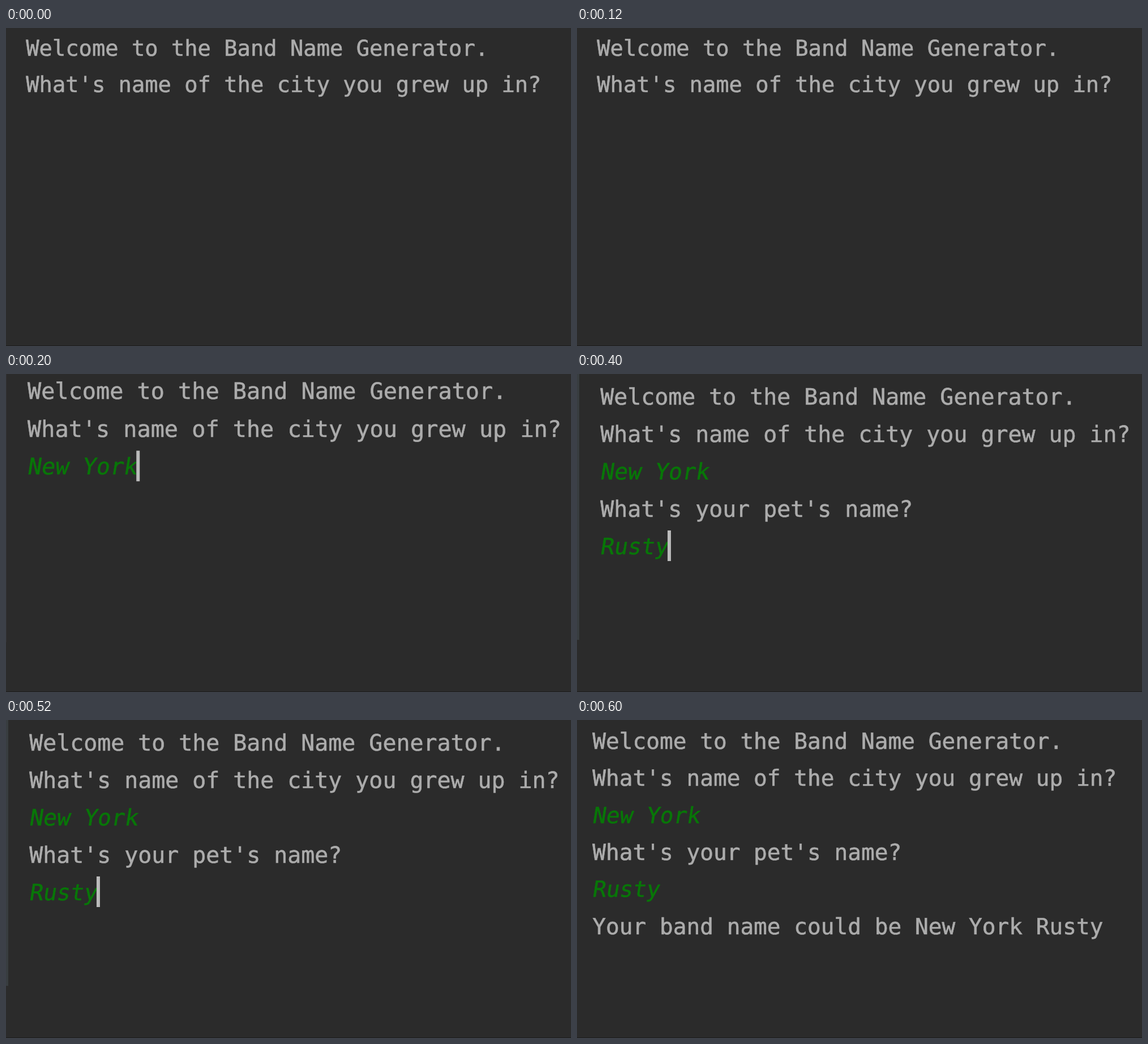
Write an HTML page that moves like this. It is 998x561 px and loops after 800 ms.

```html
<!DOCTYPE html>
<html lang="en">
<head>
<meta charset="utf-8">
<title>Band Name Generator</title>
<style>
  html, body { margin: 0; width: 100%; height: 100%; overflow: hidden; background: #2b2b2b; }
  svg { display: block; width: 100%; height: 100%; }
  text {
    font-family: "DejaVu Sans Mono", "Noto Sans Mono", monospace;
    fill: currentColor;
    stroke: currentColor;
    stroke-width: 0.6px;
    color: #acacac;
    text-rendering: geometricPrecision;
  }
  .input { color: #087608; }
</style>
</head>
<body>
<svg id="stage" viewBox="0 0 998 561"></svg>
<script>
const STEP = 200;
const ADVANCE = 0.602; // character width in em
const city = "New York", pet = "Rusty";

const lines = [
  { text: "Welcome to the Band Name Generator." },
  { text: "What's name of the city you grew up in?" },
  { text: city, input: true },
  { text: "What's your pet's name?" },
  { text: pet, input: true },
  { text: `Your band name could be ${city} ${pet}` },
];

// x, y: start of the first baseline; col, row: character and line pitch
const views = [
  { x: 35.2, y: 48.8, col: 23.35, row: 64, count: 2 },
  { x: 38.1, y: 44.3, col: 24.18, row: 66.5, count: 3, caret: true, edge: [1, 473, "#323334"] },
  { x: 41.2, y: 54, col: 24.01, row: 66, count: 5, caret: true, edge: [4, 469, "#383d40"] },
  { x: 27.2, y: 50.7, col: 23.75, row: 65.4, count: 6 },
];

const rect = (x, y, w, h, fill) =>
  `<rect x="${x}" y="${y}" width="${w}" height="${h}" fill="${fill}"/>`;

function draw({ x, y, col, row, count, caret, edge }) {
  let out = rect(0, 560, 998, 1, "#1c1c1c");
  if (edge) out += rect(0, 0, ...edge);
  lines.slice(0, count).forEach(({ text, input }, i) => {
    const place = `translate(${input ? x - 1 : x} ${y + i * row})`;
    out += `<text class="${input ? "input" : ""}" font-size="${col / ADVANCE}"
      transform="${place}${input ? " skewX(-9)" : ""}">${text}</text>`;
  });
  if (caret) {
    const end = x + lines[count - 1].text.length * col;
    out += rect(end - 1.3, y + (count - 1) * row - 42, 6, 54, "#bbb");
  }
  return out;
}

const stage = document.getElementById("stage");
const pictures = views.map(draw);
let shown = -1;

function tick() {
  const now = Math.floor(performance.now() / STEP) % views.length;
  if (now !== shown) stage.innerHTML = pictures[shown = now];
  requestAnimationFrame(tick);
}
tick();
</script>
</body>
</html>
```
